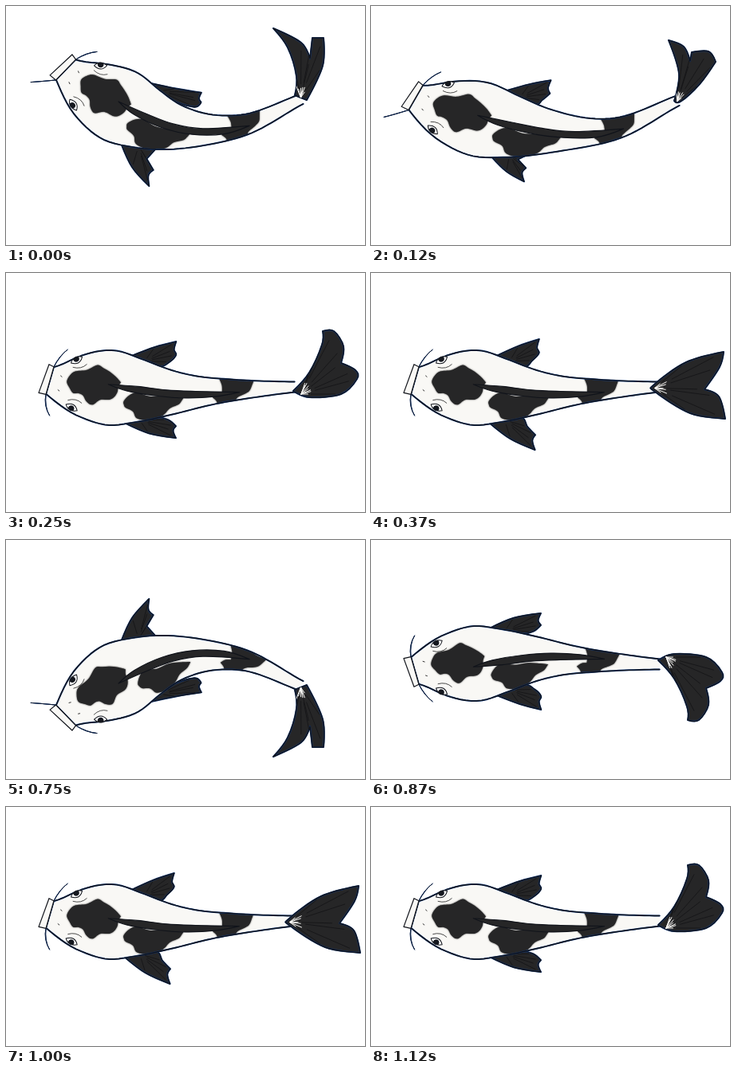
Write an HTML page with a canvas that moves like this. It is 450 px wide and 300 px high and loops after 1.25 s.

```html
<!DOCTYPE html>
<html lang="en">
<head>
<meta charset="utf-8">
<title>Swimming koi</title>
<style>
  html, body { margin: 0; width: 100%; height: 100%; overflow: hidden; background: #fff; }
  canvas { display: block; }
</style>
</head>
<body>
<canvas id="stage" width="450" height="300"></canvas>
<script>
const ctx = document.getElementById('stage').getContext('2d');
const INK = '#10131a', BLUE = '#123c82', DARK = '#262627', SKIN = '#f9f8f5';

const points = s => s.split(' ').map(p => p.split(',').map(Number));
const mix = (a, b, k) => a.map((v, i) => v + (b[i] - v) * k);

// Body coordinates: first the way from mouth (0) to tail (100), then the offset from the spine in px.
const HALF_WIDTH = [17.5, 38, 47, 39, 28, 19, 13.5, 9.5, 6.5];
const SPOTS = [
  '7,-3 10,-17 19,-27 24,-20 29,-8 28,4 25,15 18,23 14,12 10,10',
  '31,15 36,3 46,5 55,7 53,15 47,29 37,35 32,23',
  '70,-16 77,-14 84,-11 82,2 78,8 76,14 69,19 67,8 71,3'
].map(points);
const DORSAL = points('24,-4 36,-5 48,-3 60,-1 78,3 68,7 56,7 44,5 32,2');
const MOUTH = points('-2.6,-19 0,-18 0,18 -2.6,19');

// The spine starts with a guide point ahead of the mouth; fins are the tips of the upper and lower fin.
function pose(spine, tail, fins, whisker) {
  return { spine: points(spine), tail: points(tail), fins: points(fins), whisker, side: 1 };
}

function mirror(p, axis) {
  const turn = list => list.map(([x, y]) => [x, axis - y]);
  return { ...p, spine: turn(p.spine), tail: turn(p.tail), side: -1,
    fins: p.fins.map(([x, u]) => [x, -u]) };
}

const curled = pose('24,11 75,80 142,125 215,152 295,150 370,117',
  '362,112 364,88 353,52 335,28 370,46 381,66 384,40 398,40 397,75 377,118', '59,-46 45,80', -5);
const bent = pose('-4,61 56,115 136,142 221,157 306,154 384,119',
  '380,119 386,85 373,43 392,51 400,69 402,58 423,57 432,70 412,98 388,120', '50,-64 44,66', -5);
const swayed = pose('-15,102 55,135 131,144 207,150 283,147 362,143',
  '360,148 380,125 396,90 397,73 411,73 423,92 420,113 438,122 440,133 420,152 380,156', '52,-64 52,57', 3);
const straight = pose('-15,102 55,135 131,144 207,150 283,147 360,143',
  '355,140 395,112 442,99 437,118 418,146 436,155 444,183 400,176 356,149', '51,-67 50,72', 3);
const swayedDown = mirror(swayed, 299);

const timeline = [
  [0, curled], [120, bent], [250, swayed], [370, straight], [620, swayedDown],
  [750, mirror(curled, 300)], [870, swayedDown], [1000, straight], [1120, swayed]
];

// Catmull-Rom value at t between b and c.
function spline(a, b, c, d, t) {
  return b + t / 2 * (c - a + t * (2 * a - 5 * b + 4 * c - d + t * (3 * (b - c) + d - a)));
}

function halfWidth(x) {
  const w = HALF_WIDTH, i = Math.min(7, Math.floor(x / 12.5));
  return spline(w[i - 1] ?? 0, w[i], w[i + 1], w[i + 2] ?? 5, x / 12.5 - i);
}

function spineAt(p, x) {
  const s = [...p.spine, mix(p.spine[4], p.spine[5], 2)];
  const i = Math.max(0, Math.min(3, Math.floor(x / 25)));
  return [0, 1].map(k => spline(s[i][k], s[i + 1][k], s[i + 2][k], s[i + 3][k], x / 25 - i));
}

function angleAt(p, x) {
  const a = spineAt(p, x - 0.1), b = spineAt(p, x + 0.1);
  return Math.atan2(b[1] - a[1], b[0] - a[0]);
}

function place(p, [x, u]) {
  const [sx, sy] = spineAt(p, x), a = angleAt(p, x);
  return [sx - u * Math.sin(a), sy + u * Math.cos(a)];
}

// Smooth closed curve that keeps sharp turns as corners.
function curve(list) {
  const n = list.length, at = i => list[(i + n) % n];
  const tangent = i => {
    const [a, b, c] = [at(i - 1), at(i), at(i + 1)];
    const v = [b[0] - a[0], b[1] - a[1]], w = [c[0] - b[0], c[1] - b[1]];
    const cos = (v[0] * w[0] + v[1] * w[1]) / Math.hypot(...v) / Math.hypot(...w);
    return cos < 0.35 ? [0, 0] : [(c[0] - a[0]) / 6, (c[1] - a[1]) / 6];
  };
  const path = new Path2D();
  path.moveTo(...list[0]);
  for (let i = 0; i < n; i++) {
    const b = at(i), c = at(i + 1), tb = tangent(i), tc = tangent(i + 1);
    path.bezierCurveTo(b[0] + tb[0], b[1] + tb[1], c[0] - tc[0], c[1] - tc[1], ...c);
  }
  return path;
}

// Adds small bumps between the points of a patch.
function rough(list) {
  return list.flatMap((a, i) => {
    const b = list[(i + 1) % list.length], k = Math.sin(i * 9 + 1) * 0.14;
    const [x, y] = mix(a, b, 0.5);
    return [a, [x + (b[1] - a[1]) * k, y - (b[0] - a[0]) * k]];
  });
}

function fill(path, color) {
  ctx.fillStyle = color;
  ctx.fill(path);
}

function stroke(path, color, width) {
  ctx.strokeStyle = color;
  ctx.lineWidth = width;
  ctx.stroke(path);
}

function outline(path) {
  stroke(path, BLUE, 2);
  stroke(path, INK, 1.4);
}

function line(a, b, color, width) {
  const path = new Path2D();
  path.moveTo(...a);
  path.lineTo(...b);
  stroke(path, color, width);
}

function membrane(list, streaks) {
  const path = curve(list), root = mix(list[0], list[list.length - 1], 0.5);
  fill(path, DARK);
  outline(path);
  ctx.save();
  ctx.clip(path);
  for (const end of list.slice(1, -1)) {
    line(mix(root, end, 0.25), mix(root, end, 0.85), '#141416', 0.8);
    if (streaks) line(root, mix(root, end, 0.17), SKIN, 1);
  }
  ctx.restore();
}

function fin(p, [x, u]) {
  const s = Math.sign(u), front = [32, 42 * s], back = [44, 32 * s];
  const [mx, mu] = mix(front, [x, u], 0.5);
  const shape = [front, [mx, mu + 3 * s], [x, u], [x - 1, u * 0.84], [x, u * 0.74], [x - 3, u * 0.6], back];
  membrane(shape.map(q => place(p, q)));
}

function whisker(p, x, u) {
  const [a, b, c] = [[0, u * 0.42], [x * 0.4 - 1, u * 0.75], [x, u]].map(q => place(p, q));
  const path = new Path2D();
  path.moveTo(...a);
  path.quadraticCurveTo(...b, ...c);
  path.quadraticCurveTo(...mix(b, c, 0.2), ...a);
  fill(path, '#fff');
  stroke(path, BLUE, 1);
  stroke(path, INK, 0.5);
}

function eye(p, u, turn) {
  ctx.save();
  ctx.translate(...place(p, [10, u * p.side]));
  ctx.rotate(angleAt(p, 10) + turn * p.side);
  ctx.scale(1, -Math.sign(u * p.side));
  const lid = new Path2D('M-8 1Q-1-7 8 0Q1 9-8 1Z');
  fill(lid, '#fff');
  stroke(lid, INK, 1);
  fill(new Path2D('M-4-2Q0-5 4-2Q4 3 0 3Q-4 3-4-2Z'), '#15181f');
  stroke(new Path2D('M-8 7Q0 14 9 11'), '#333', 0.8);
  ctx.restore();
}

function bodySide(p, side) {
  return Array.from({ length: 51 }, (_, i) => place(p, [i * 2, side * halfWidth(i * 2)]));
}

function draw(p) {
  const shape = (list, side = 1) => list.map(([x, u]) => place(p, [x, u * side]));
  ctx.fillStyle = '#fff';
  ctx.fillRect(0, 0, 450, 300);
  ctx.lineJoin = ctx.lineCap = 'round';
  p.fins.forEach(tip => fin(p, tip));

  const body = new Path2D();
  for (const q of [...bodySide(p, -1).reverse(), ...bodySide(p, 1)]) body.lineTo(...q);
  fill(body, SKIN);
  ctx.save();
  ctx.clip(body);
  ctx.shadowColor = DARK;
  ctx.shadowBlur = 2;
  for (const spot of SPOTS) fill(curve(rough(shape(spot))), DARK);
  ctx.restore();

  const dorsal = curve(shape(DORSAL, p.side));
  fill(dorsal, DARK);
  stroke(dorsal, INK, 1.2);
  outline(body);
  membrane(p.tail, true);

  whisker(p, 5, -43 * p.side);
  whisker(p, p.whisker, 43 * p.side);
  const mouth = curve(shape(MOUTH));
  fill(mouth, SKIN);
  stroke(mouth, INK, 1.2);
  eye(p, -32, -0.55);
  eye(p, 29, 0.34);
  for (const u of [-9, 9]) line(place(p, [4, u]), place(p, [4.6, u + 1]), '#333', 1);
}

function frame(now) {
  const t = now % 1250;
  draw(timeline.filter(([start]) => start <= t).pop()[1]);
  requestAnimationFrame(frame);
}
frame(0);
</script>
</body>
</html>
```
